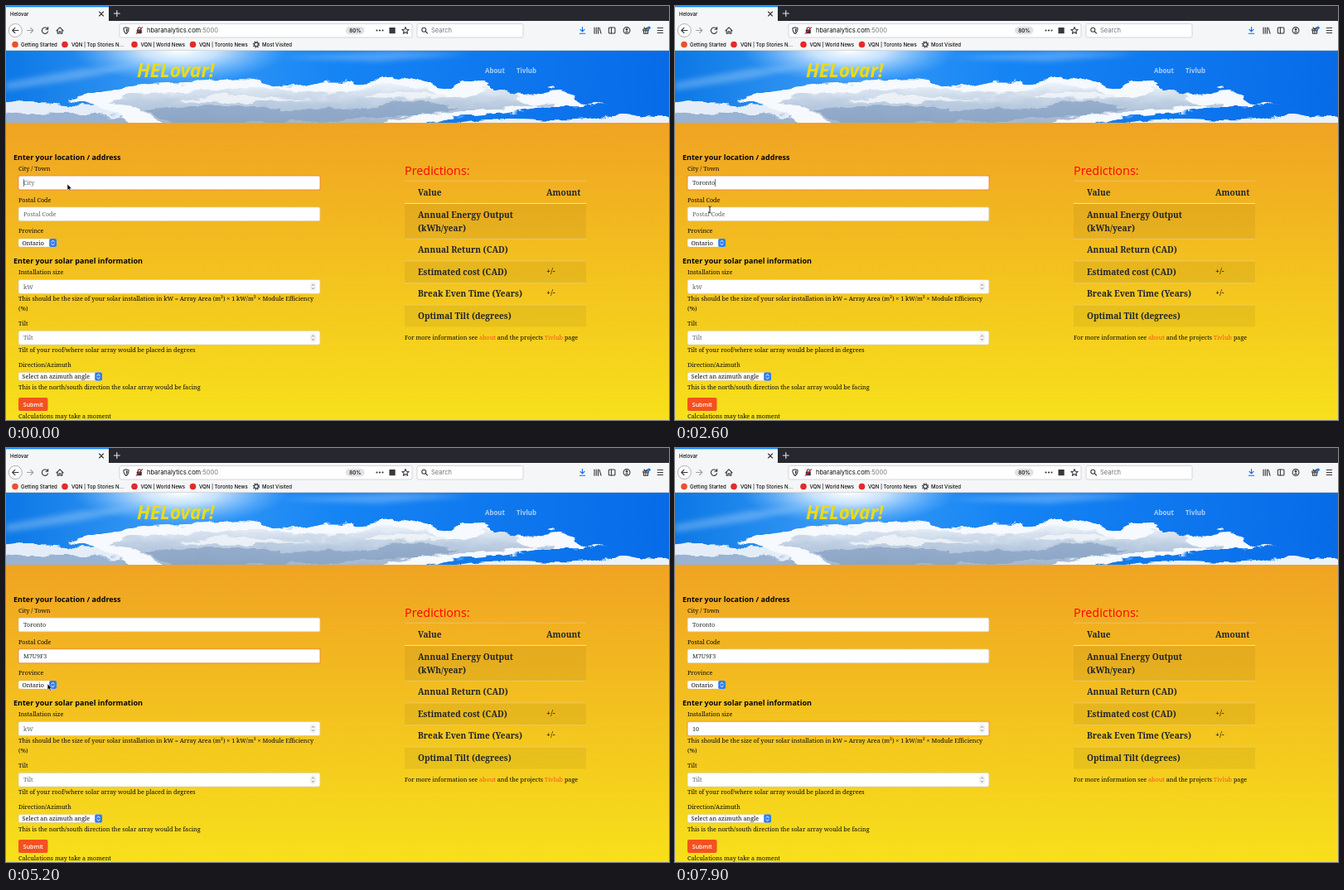
Write an HTML page that moves like this. It is 800 px wide and 500 px high and loops after 8 s.

```html
<!DOCTYPE html>
<html lang="en">
<head>
<meta charset="utf-8">
<title>Helovar</title>
<style>
  html, body { margin: 0; width: 100%; height: 100%; overflow: hidden; background: #f3c120; }
  svg { display: block; width: 800px; height: 500px; }
  text { white-space: pre; }
  .ui { font: 500 6.05px Inter, sans-serif; fill: #0c0c0d; }
  .serif { font: 500 7.23px "Noto Serif", serif; fill: #0a0a0a; }
  .cell { font: 700 10.15px "Noto Serif", serif; fill: #212529; }
  .head { font: 700 9px "Open Sans", sans-serif; fill: #050505; }
  .nav { font: 700 7.9px "Open Sans", sans-serif; fill: #fff; fill-opacity: .65; }
  .line { fill: none; stroke: #38383d; stroke-width: 1.1; stroke-linecap: round; stroke-linejoin: round; }
</style>
</head>
<body>
<svg id="stage" viewBox="0 0 800 500" xmlns="http://www.w3.org/2000/svg">
  <defs>
    <linearGradient id="page" x2="0" y2="1">
      <stop stop-color="#f0a323"/><stop offset="1" stop-color="#f7e01b"/>
    </linearGradient>
    <linearGradient id="sky">
      <stop stop-color="#0c78e6"/><stop offset=".25" stop-color="#3a9cf6"/>
      <stop offset=".5" stop-color="#1584f4"/><stop offset="1" stop-color="#076be8"/>
    </linearGradient>
    <linearGradient id="cloud" x2="0" y2="1">
      <stop stop-color="#edf3fa"/><stop offset=".45" stop-color="#bccde1"/><stop offset="1" stop-color="#9db3cf"/>
    </linearGradient>
    <radialGradient id="sun">
      <stop stop-color="#fff"/><stop offset=".35" stop-color="#e9f4ff" stop-opacity=".8"/>
      <stop offset="1" stop-color="#9fd0ff" stop-opacity="0"/>
    </radialGradient>
    <filter id="ragged" x="-2%" y="-10%" width="104%" height="120%">
      <feTurbulence type="fractalNoise" baseFrequency=".035 .09" numOctaves="3" seed="4"/>
      <feDisplacementMap in="SourceGraphic" scale="13" xChannelSelector="R" yChannelSelector="G"/>
      <feGaussianBlur stdDeviation=".6"/>
    </filter>
    <filter id="haze"><feGaussianBlur stdDeviation="3"/></filter>
    <filter id="drop" x="-5%" y="-30%" width="110%" height="200%">
      <feDropShadow dx="0" dy="1.8" stdDeviation="1.3" flood-opacity=".95"/>
    </filter>
    <clipPath id="banner"><rect y="54" width="800" height="87"/></clipPath>
  </defs>

  <!-- page and sky -->
  <rect y="140" width="800" height="360" fill="url(#page)"/>
  <g clip-path="url(#banner)">
    <rect y="54" width="800" height="87" fill="url(#sky)"/>
    <ellipse cx="210" cy="54" rx="130" ry="38" fill="url(#sun)"/>
    <path filter="url(#haze)" fill="#fff" opacity=".25" d="M0 92L90 76 160 72 90 88 0 102zM330 62L470 54 560 58 450 67z"/>
    <g filter="url(#ragged)">
      <path fill="#e4edf7" d="M-9 119Q30 115 70 119T130 122L175 146H-9z"/>
      <path fill="#9ab2d3" d="M-9 131Q50 126 110 131T190 137V146H-9z"/>
      <path fill="#f6f9fd" d="M75 114Q105 104 145 98T215 92 270 89 318 94 365 95 412 92 450 88 500 92 545 93 587 99 645 104 686 110 722 117Q700 122 680 121T620 127 540 133L500 146H150Q150 128 75 114z"/>
      <path fill="url(#cloud)" d="M122 116Q150 105 205 104T285 99 355 104 430 100 510 102 570 104 620 112 660 117Q610 123 565 127T490 132L440 146H190Q180 123 122 116z"/>
      <path fill="#7e99be" opacity=".6" d="M170 126Q250 116 330 123T450 119 545 124Q510 133 430 135T280 143H205z"/>
      <path fill="#fff" opacity=".65" d="M210 114Q260 105 310 110T390 108Q340 117 290 116T210 114zM430 109Q490 102 545 108Q500 115 430 109z"/>
      <path fill="#eaf2fb" d="M520 146Q580 134 640 138T718 134 760 132 809 133V146z"/>
    </g>
  </g>
  <text x="158" y="85.5" font-family="Open Sans, sans-serif" font-weight="700" font-style="italic" font-size="22.6" fill="#eadb18">HELovar!</text>
  <text class="nav" x="578" y="81">About</text>
  <text class="nav" x="616" y="81">Tivlub</text>

  <!-- browser window -->
  <rect width="800" height="19" fill="#27282f"/>
  <rect y="18" width="800" height="36" fill="#f5f6f7"/>
  <rect width="124" height="19" fill="#f5f6f7"/>
  <rect width="124" height="1.3" fill="#0a84ff"/>
  <rect y="53.2" width="800" height=".8" fill="#cfd0d2"/>
  <text class="ui" x="5" y="11.7">Helovar</text>
  <path class="line" d="M112.5 7l5 5m0-5l-5 5"/>
  <path class="line" style="stroke:#e8e8ea" d="M130.3 9h7M133.8 5.5v7"/>
  <g fill="#fff" stroke="#c6c6c9" stroke-width=".7">
    <circle cx="11.3" cy="29.5" r="8" stroke="#8e8e92"/>
    <rect x="137" y="21.5" width="353" height="16.5" rx="1.8"/>
    <rect x="496" y="21.5" width="128" height="16.5" rx="1.8"/>
  </g>
  <g class="line">
    <path d="M15 29.5H7.7m3.2-3.2l-3.2 3.2 3.2 3.2"/>
    <path stroke="#a0a0a4" d="M25.5 29.5h7.3m-3.2-3.2l3.2 3.2-3.2 3.2"/>
    <path d="M50.4 28a3.7 3.7 0 1 0 .2 2.8M50.7 25.6v2.7H48"/>
    <path d="M60.9 29.8l4.1-4 4.1 4M62.2 29v4.2h1.9v-2.5h1.8v2.5h1.9V29"/>
    <path d="M145 25.7l3.1 1c0 3.3-.8 5.2-3.1 6.8-2.3-1.6-3.1-3.5-3.1-6.8z"/>
    <path d="M482 25.6l1.2 2.6 2.9.3-2.2 1.9.7 2.9-2.6-1.5-2.6 1.5.7-2.9-2.2-1.9 2.9-.3z"/>
    <circle cx="504.3" cy="28.8" r="2.5"/><path d="M506.2 30.7l2.3 2.3"/>
    <path style="stroke:#0a6cf0" d="M695.5 25.5v5.2m-2.5-2.3l2.5 2.5 2.5-2.5M692.3 33.2h6.4"/>
    <path d="M710 26v7.2M712.3 26v7.2M714.5 26v7.2M716 26.4l2 6.8"/>
    <rect x="727.3" y="26" width="7.6" height="7" rx="1"/><path d="M730.4 26v7"/>
    <circle cx="749" cy="29.5" r="3.9"/>
    <path d="M768.8 28h6.4v1.8h-6.4zM769.5 30v3.3h5V30M772 28v5.3M770 26l2 2 2-2"/>
    <path d="M786.2 26.5h6.4M786.2 29.5h6.4M786.2 32.5h6.4"/>
  </g>
  <g fill="#38383d">
    <rect x="157.8" y="28.6" width="6" height="4.6" rx=".7"/>
    <path d="M145 27.2v4.7c1.2-1 1.7-2.3 1.7-4.2z"/>
    <circle cx="447.5" cy="29.5" r="1.1"/><circle cx="451" cy="29.5" r="1.1"/><circle cx="454.5" cy="29.5" r="1.1"/>
    <rect x="462.5" y="26" width="7.2" height="7.2"/>
    <circle cx="749" cy="28.4" r="1.4"/><path d="M746.6 32q2.4-3 4.8 0z"/>
  </g>
  <path class="line" d="M159.2 28.7v-1.2a1.7 1.7 0 0 1 3.4 0v1.2"/>
  <path class="line" style="stroke:#e2203d" d="M157.2 33.4l7.5-7.7"/>
  <circle cx="776" cy="26.2" r="1.7" fill="#0a72f0"/>
  <text class="ui" x="170" y="32.2" style="font-size:7.5px;font-weight:400">hbaranalytics.com<tspan fill="#77777b">:5000</tspan></text>
  <rect x="410" y="25" width="22.5" height="9.2" rx="4.6" fill="#e1e1e3"/>
  <text class="ui" x="414.3" y="31.9" style="font-size:6.3px">80%</text>
  <text class="ui" x="513" y="32.2" style="font-size:7.5px;font-weight:400;fill:#737377">Search</text>
  <circle cx="11" cy="46.5" r="3.8" fill="#e8512f"/>
  <g fill="#e32a2a"><circle cx="71" cy="46.5" r="3.8"/><circle cx="155" cy="46.5" r="3.8"/><circle cx="225.5" cy="46.5" r="3.8"/></g>
  <circle cx="302" cy="46.5" r="2.4" fill="none" stroke="#38383d" stroke-width="1.2"/>
  <circle cx="302" cy="46.5" r="3.6" fill="none" stroke="#38383d" stroke-width="1.3" stroke-dasharray="1.3 1.53"/>
  <g class="ui">
    <text x="18" y="48.7">Getting Started</text>
    <text x="79" y="48.7">VQN | Top Stories N...</text>
    <text x="162.5" y="48.7">VQN | World News</text>
    <text x="233" y="48.7">VQN | Toronto News</text>
    <text x="309" y="48.7">Most Visited</text>
  </g>

  <!-- form -->
  <g class="head">
    <text x="9" y="185.5">Enter your location / address</text>
    <text x="9" y="310.8">Enter your solar panel information</text>
  </g>
  <g class="serif">
    <text x="15" y="198.9">City / Town</text>
    <text x="15" y="236.7">Postal Code</text>
    <text x="15" y="274.2">Province</text>
    <text x="15" y="324.3">Installation size</text>
    <text x="15" y="356">This should be the size of your solar installation in kW = Array Area (m²) × 1 kW/m² × Module Efficiency</text>
    <text x="15" y="368.3">(%)</text>
    <text x="15" y="386.2">Tilt</text>
    <text x="15" y="418">Tilt of your roof/where solar array would be placed in degrees</text>
    <text x="15" y="436.2">Direction/Azimuth</text>
    <text x="15" y="463">This is the north/south direction the solar array would be facing</text>
    <text x="15" y="498">Calculations may take a moment</text>
  </g>
  <g id="form"></g>
  <rect x="15" y="473" width="35.5" height="16" rx="2" fill="#f4511e"/>
  <text x="20.8" y="483.5" font-family="Open Sans, sans-serif" font-weight="600" font-size="7" fill="#fff">Submit</text>

  <!-- predictions -->
  <text x="481" y="204.4" font-family="Open Sans, sans-serif" font-weight="500" font-size="14.4" fill="#ff0000">Predictions:</text>
  <g fill="#000" fill-opacity=".055">
    <rect x="481" y="239" width="219" height="42"/>
    <rect x="481" y="308" width="219" height="26.5"/>
    <rect x="481" y="361" width="219" height="26.5"/>
  </g>
  <path stroke="#dee2e6" stroke-width=".7" stroke-opacity=".5" d="M481 211.3h219M481 281.2h219M481 308h219M481 334.7h219M481 361.2h219"/>
  <path stroke="#dee2e6" stroke-width="1.1" d="M481 238.5h219"/>
  <g class="cell">
    <text x="497" y="228.5">Value</text><text x="652" y="228.5">Amount</text>
    <text x="497" y="255.5">Annual Energy Output</text><text x="497" y="271.5">(kWh/year)</text>
    <text x="497" y="297.8">Annual Return (CAD)</text>
    <text x="497" y="324.6">Estimated cost (CAD)</text>
    <text x="497" y="351.2">Break Even Time (Years)</text>
    <text x="497" y="377.6">Optimal Tilt (degrees)</text>
  </g>
  <g class="serif">
    <g style="font-size:9.3px"><text x="652" y="322.6">+/-</text><text x="652" y="349">+/-</text></g>
    <text x="481" y="403.4">For more information see <tspan fill="#f4511e">about</tspan> and the projects <tspan fill="#f4511e">Tivlub</tspan> page</text>
  </g>

  <!-- moving parts -->
  <g id="menu">
    <rect x="15" y="0" width="363.5" height="11" fill="#fff" filter="url(#drop)"/>
    <rect x="15" y="0" width="363.5" height=".6" fill="#b8b8b8"/>
    <text class="ui" id="option" x="18" y="7.8" style="font-size:6.4px"></text>
  </g>
  <rect id="caret" width=".6" height="9" fill="#222"/>
  <g id="pointer">
    <path id="arrow" d="M0 0v7.6l1.8-1.6 1.2 2.8 1.3-.6L3.1 5.5h2.4z" fill="#000" stroke="#fff" stroke-width=".6"/>
    <path id="beam" d="M-1.6-4Q0-4 0-3Q0-4 1.6-4M0-3V3M-1.6 4Q0 4 0 3Q0 4 1.6 4" fill="none" stroke="#111" stroke-width=".9"/>
  </g>
</svg>
<script>
const LOOP = 8000, BLINK = 1100;
const CODE = "M7U9F3";
const $ = id => document.getElementById(id);

function add(parent, tag, attrs, text = "") {
  const el = document.createElementNS("http://www.w3.org/2000/svg", tag);
  for (const k in attrs) el.setAttribute(k, attrs[k]);
  el.textContent = text;
  parent.append(el);
  return el;
}

function makeField(y, hint, spin) {
  const g = $("form");
  const glow = add(g, "rect", { x: 14, y: y - 1, width: 366, height: 19, rx: 3, fill: "#f4511e", "fill-opacity": .25 });
  const box = add(g, "rect", { x: 15.2, y: y + .2, width: 363.6, height: 16.6, rx: 1.9, fill: "#fff", "stroke-width": .6 });
  const label = add(g, "text", { class: "serif", x: 21, y: y + 11 });
  if (spin) {
    add(g, "rect", { x: 367.5, y: y + 3.5, width: 6, height: 10, rx: 2.5, fill: "#f6f6f6", stroke: "#ddd", "stroke-width": .4 });
    add(g, "path", { class: "line", style: "stroke:#666;stroke-width:.7", d: `M369.3 ${y + 7}l1.2-1.5 1.2 1.5m0 3l-1.2 1.5-1.2-1.5` });
  }
  return { y, hint, glow, box, label };
}

function makeSelect(y, width, text) {
  const g = $("form"), right = 15 + width;
  add(g, "rect", { x: 15, y, width, height: 10, rx: 1.8, fill: "#fff", stroke: "#c9b479", "stroke-width": .4 });
  add(g, "rect", { x: right - 8.8, y, width: 8.8, height: 10, rx: 1.8, fill: "#2f7df0" });
  add(g, "path", { class: "line", style: "stroke:#fff;stroke-width:.9", d: `M${right - 6} ${y + 4}l1.6-1.9 1.6 1.9m0 2l-1.6 1.9-1.6-1.9` });
  add(g, "text", { class: "serif", x: 19.5, y: y + 7.6 }, text);
}

const fields = [
  makeField(205, "City"),
  makeField(242.8, "Postal Code"),
  makeField(330.5, "kW", true),
  makeField(392.2, "Tilt", true)
];
makeSelect(281, 46, "Ontario");
makeSelect(442.6, 101, "Select an azimuth angle");

// time, focused field, its text, suggestion
const edits = [
  [0, 0, "", ""],
  [500, 0, "T", "Toronto"],
  [700, 0, "To", "Toronto"],
  [850, 0, "Tor", "Toronto"],
  [1000, 0, "Toro", "Toronto"],
  [2100, 0, "Toronto", ""],
  [2900, 1, "", ""],
  [3300, 1, "M", CODE],
  [4300, 1, CODE, ""],
  [6800, 2, "", ""],
  [7200, 2, "1", ""],
  [7300, 2, "10", ""]
];

// time, x, y, shape from here on
const path = [
  [0, 74, 215, "arrow"],
  [500, 74, 215, ""],
  [1900, 60, 224, "arrow"],
  [2200, 46, 229, "arrow"],
  [2400, 42, 244, "beam"],
  [2600, 42, 246, "beam"],
  [2900, 41, 251, "beam"],
  [3300, 41, 251, ""],
  [3900, 40, 258, "arrow"],
  [4200, 38, 263, "arrow"],
  [4700, 38, 263, "arrow"],
  [5400, 53, 290, "arrow"],
  [6200, 53, 290, "arrow"],
  [6550, 58, 333, "beam"],
  [6800, 60, 339, "beam"],
  [7200, 60, 339, ""]
];

const show = (el, on) => el.setAttribute("visibility", on ? "visible" : "hidden");

function drawForm(t) {
  const past = edits.filter(e => e[0] <= t);
  const [since, focus, , tip] = past[past.length - 1];
  const values = ["", "", "", ""];
  for (const [, i, text] of past) values[i] = text;

  fields.forEach((f, i) => {
    const on = i === focus;
    show(f.glow, on);
    f.box.setAttribute("stroke", on ? "#f39a7e" : "#d0d4d9");
    f.label.textContent = values[i] || f.hint;
    f.label.style.fill = values[i] ? "#24282c" : "#5c646b";
  });

  const field = fields[focus];
  const width = values[focus] ? field.label.getComputedTextLength() : 0;
  $("caret").setAttribute("x", 21 + width);
  $("caret").setAttribute("y", field.y + 4);
  show($("caret"), (t - since) % BLINK < BLINK / 2);

  $("menu").style.display = tip ? "" : "none";
  $("menu").setAttribute("transform", `translate(0 ${field.y + 17})`);
  $("option").textContent = tip;
}

function drawPointer(t) {
  const i = path.filter(p => p[0] <= t).length - 1;
  const a = path[i], b = path[i + 1] || a;
  const k = b === a ? 0 : (t - a[0]) / (b[0] - a[0]);
  const ease = k * k * (3 - 2 * k);
  const mix = n => a[n] + (b[n] - a[n]) * ease;
  $("pointer").setAttribute("transform", `translate(${mix(1)} ${mix(2)})`);
  show($("arrow"), a[3] === "arrow");
  show($("beam"), a[3] === "beam");
}

const start = performance.now();
function frame() {
  const t = (performance.now() - start) % LOOP;
  drawForm(t);
  drawPointer(t);
  requestAnimationFrame(frame);
}
frame();
</script>
</body>
</html>
```
